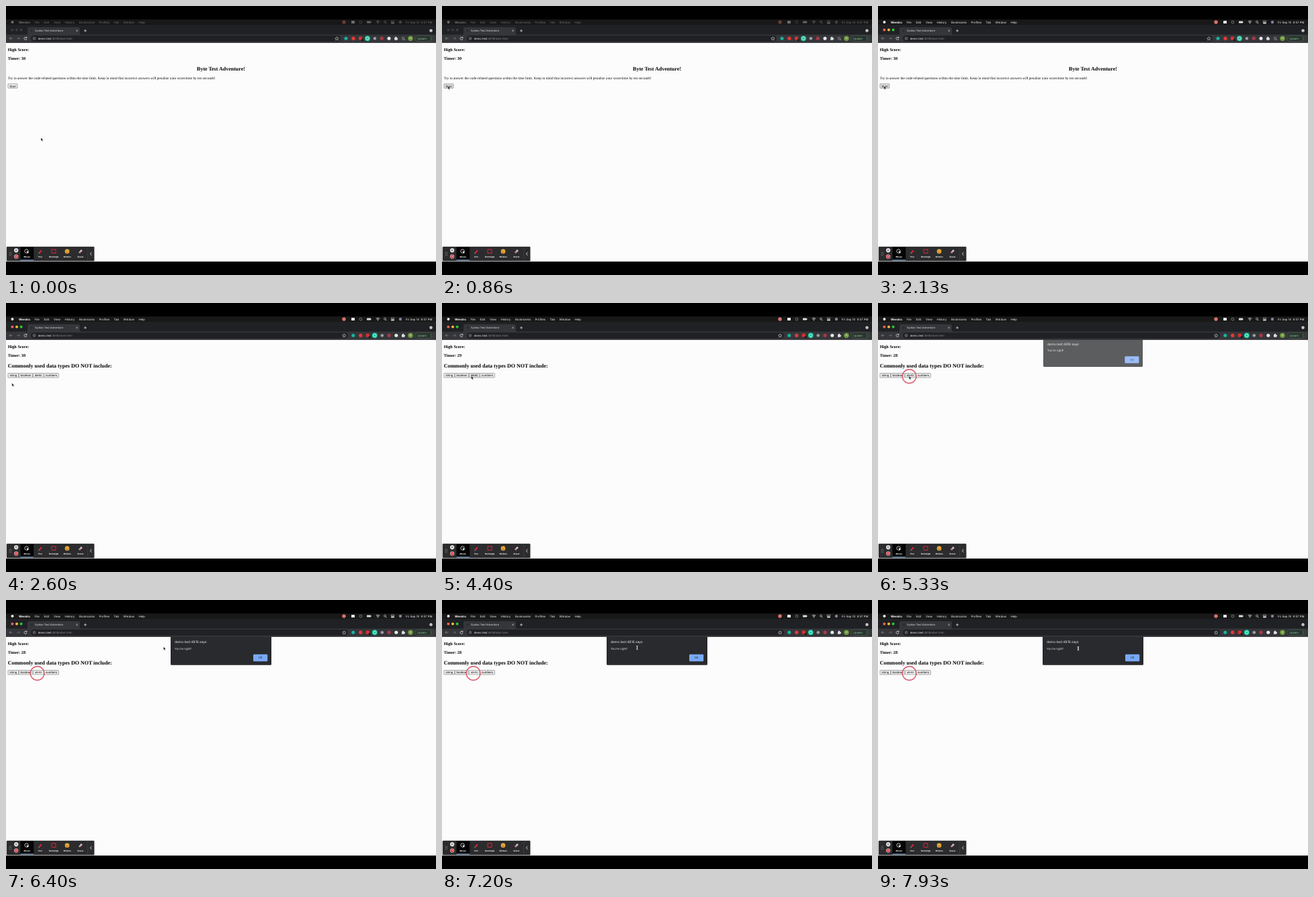
Recreate the animation shown at these times as an HTML page. Size 640 by 400 pixels, loop 8 s.

```html
<!DOCTYPE html>
<html lang="en">
<head>
<meta charset="utf-8">
<title>Quiz recording</title>
<style>
html, body { margin: 0; width: 100%; height: 100%; overflow: hidden; background: #000; }
svg { display: block; width: 640px; height: 400px; text-rendering: geometricPrecision; }
text { font-family: Inter, Roboto, sans-serif; white-space: pre; }
.page text { font-family: "Liberation Serif", serif; fill: #000; }
.page .btn text { font-family: "Liberation Sans", sans-serif; font-size: 4.44px; text-anchor: middle; }
.btn rect { fill: #efefef; stroke: #6f6f6f; stroke-width: .6; }
.btn.hover rect { fill: #e2e2e2; }
.b { font-weight: 700; }
</style>
</head>
<body>
<svg id="stage" viewBox="0 0 640 400"></svg>
<script>
const LOOP = 8000;
const stage = document.getElementById("stage");
const $ = id => document.getElementById(id);

const text = (x, y, size, str, more = "") => `<text x="${x}" y="${y}" font-size="${size}" ${more}>${str}</text>`;
const rect = (x, y, w, h, fill, more = "") => `<rect x="${x}" y="${y}" width="${w}" height="${h}" fill="${fill}" ${more}/>`;
const dot = (x, y, r, fill, more = "") => `<circle cx="${x}" cy="${y}" r="${r}" fill="${fill}" ${more}/>`;
const line = (d, color, width = .7, more = "") => `<path d="${d}" fill="none" stroke="${color}" stroke-width="${width}" ${more}/>`;
const group = (id, body) => `<g id="${id}">${body}</g>`;
const button = (x, y, w, label) => `<g class="btn" data-box="${x},${y},${w},7">` +
  rect(x + .3, y + .3, w - .6, 6.4, "", 'rx=".7"') + text(x + w / 2, y + 5.1, 4.44, label) + "</g>";

const page = `<g class="page">
  ${rect(0, 54.5, 640, 325.5, "#fcfcfc")}
  ${text(2.67, 66.7, 6.24, "High Score:", 'class="b"')}
  ${text(2.67, 79.9, 6.24, "", 'class="b" id="timer"')}
  ${group("intro",
    text(320, 95.7, 8, "Byte Test Adventure!", 'class="b" text-anchor="middle"') +
    text(2.67, 108.9, 5.33, "Try to answer the code-related questions within the time limit. Keep in mind that incorrect answers will penalize your score/time by ten seconds!") +
    button(2.67, 115.5, 14.6, "Start"))}
  ${group("question",
    text(2.67, 95.7, 8, "Commonly used data types DO NOT include:", 'class="b"') +
    button(2.67, 104.2, 16.3, "string") + button(18.97, 104.2, 21, "boolean") +
    button(39.97, 104.2, 16.4, "alerts") + button(56.37, 104.2, 22.3, "numbers"))}
</g>`;

const dialog = group("dialog",
  rect(245, 53.5, 150, 43.3, "#292a2d", 'rx="1.5"') +
  text(251, 64, 4.9, "demo.test:4816 says", 'fill="#e8eaed"') +
  text(251, 73.7, 4.3, "You're right!", 'fill="#e8eaed"') +
  rect(368, 80.7, 21.3, 10.6, "#78a9f7", 'rx="1.3"') +
  text(378.7, 87.4, 4, "OK", 'fill="#202124" text-anchor="middle"'));

const menus = [["File", 42.5], ["Edit", 56.5], ["View", 71], ["History", 87.5], ["Bookmarks", 109],
  ["Profiles", 138.5], ["Tab", 160.5], ["Window", 174.5], ["Help", 197.5]];
const menuBar = rect(0, 20, 640, 8, "#181818") + group("menu",
  dot(9.5, 24, 2, "#eee") +
  text(19, 25.6, 4.4, "Wendro", 'class="b" fill="#fff"') +
  menus.map(([m, x]) => text(x, 25.6, 4.35, m, 'fill="#f2f2f2"')).join("") +
  dot(503, 24, 2.7, "#d9746c") + rect(514, 22, 5, 4, "#eee", 'rx=".5"') +
  dot(528, 24, 1.9, "none", 'stroke="#999" stroke-width=".7"') +
  rect(537, 22.5, 6, 3, "#ddd", 'rx=".7"') + rect(543.4, 23.4, .6, 1.2, "#ddd") +
  line("M550.8 23.3q2.7-2.4 5.4 0M551.9 24.6q1.6-1.4 3.2 0", "#eee", .8) + dot(553.5, 25.7, .6, "#eee") +
  dot(564, 23.6, 1.5, "none", 'stroke="#eee" stroke-width=".6"') + line("M565 24.7l1.6 1.6", "#eee") +
  rect(573, 22, 5, 1.7, "none", 'rx=".8" stroke="#eee" stroke-width=".5"') + rect(573, 24.5, 5, 1.7, "#eee", 'rx=".8"') +
  dot(587, 24, 2.2, "#8b7d9c") +
  text(634.5, 25.6, 4.35, "Fri Sep 10  9:57 PM", 'fill="#f2f2f2" text-anchor="end"'));

const cross = (x, y, r) => `M${x - r} ${y - r}l${2 * r} ${2 * r}M${x + r} ${y - r}l${-2 * r} ${2 * r}`;
const lights = ["#ff5f57", "#febc2e", "#28c840"];
const tabs = rect(0, 28, 640, 15, "#202124") +
  `<path d="M30 43q2 0 2-2v-7q0-2.5 2.5-2.5h73q2.5 0 2.5 2.5v7q0 2 2 2z" fill="#35363a"/>` +
  group("lights", lights.map((c, i) => dot(9.4 + i * 6.6, 35.6, 2, c)).join("")) +
  group("lightsOff", lights.map((c, i) => dot(9.4 + i * 6.6, 35.6, 2, "#3b3c40")).join("")) +
  dot(38, 36.7, 1.8, "#2a2b2e") +
  text(43, 38.1, 3.95, "Syntax Test Adventure", 'fill="#dfe1e5"') +
  line(cross(105.6, 36.7, 1.2), "#e8eaed", .6) +
  line("M118 34.8v4M116 36.8h4", "#e8eaed", .7) +
  dot(632.5, 36.6, 2.2, "#e8eaed") + line("M631.4 36.2l1.1 1.1 1.1-1.1", "#202124", .6);

const extensions = [[506, "#18b3a0", 2.5], [517, "#e03a36", 2.7], [549, "#9a9da1", 2.3],
  [559.3, "#a93a45", 2.6], [570, "#e9eaec", 2.5]];
const toolbar = rect(0, 42.5, 640, 12.2, "#35363a") +
  line("M9.6 48.2H5M7 46.2l-2 2 2 2", "#8d9094", .7) + line("M16 48.2h4.6M18.6 46.2l2 2-2 2", "#707377", .7) +
  line("M30.6 47.2a2 2 0 1 0 .3 1.6M31 45.8v1.7h-1.7", "#e8eaed", .7) +
  rect(37, 43.9, 461, 8.8, "#202124", 'rx="4.4" id="pill"') +
  dot(42, 48.3, 1.8, "none", 'stroke="#aeb1b5" stroke-width=".6"') + line("M42 47.9v1.4M42 46.9v.5", "#aeb1b5", .5) +
  text(47.7, 49.8, 4.2, 'demo.test<tspan fill="#8b8f94">:4816/start.html</tspan>', 'fill="#f1f3f4"') +
  group("tools",
    `<path d="M492.5 45.7l.8 1.8 1.9.2-1.4 1.3.4 1.9-1.7-1-1.7 1 .4-1.9-1.4-1.3 1.9-.2z" fill="none" stroke="#d5d7da" stroke-width=".6"/>` +
    extensions.map(([x, c, r]) => dot(x, 48.2, r, c)).join("") +
    rect(525, 45.6, 5, 5, "#d9302f", 'rx=".6"') + rect(529, 49.6, 2.6, 2.2, "#111") +
    dot(538, 48.2, 4, "#16c098") + dot(538, 48.2, 2.2, "none", 'stroke="#d9fff4" stroke-width=".8"') +
    rect(578.2, 46.7, 4, 4, "#dcdee1", 'rx=".5"') + dot(580.2, 46.4, 1, "#dcdee1") + dot(582.4, 48.7, 1, "#dcdee1")) +
  group("playlist", line("M588.7 46.6h4.6M588.7 48.2h4.6M588.7 49.8h2.4", "#9a9da1", .6) + dot(592.7, 50, .9, "#9a9da1")) +
  dot(602, 48.2, 3.7, "#6e9c3c") + text(602, 49.4, 3.3, "M", 'fill="#eaf3dd" text-anchor="middle"') +
  rect(609, 44, 27, 8.5, "#2b332f", 'rx="4.2" stroke="#56705f" stroke-width=".5"') +
  text(612, 49.7, 4, "Update", 'fill="#81c995"') +
  [46.3, 48.2, 50.1].map(y => dot(632.8, y, .5, "#81c995")).join("");

const label = (x, s) => text(x, 373.9, 2.9, s, 'class="b" fill="#fff" text-anchor="middle"');
const recorder = rect(.5, 357.5, 131.5, 22.5, "#777", 'rx="1.5" opacity=".5"') +
  rect(1, 358, 130.2, 21, "#2c2c2e", 'rx="1"') +
  [366.2, 368.5, 370.8].map(y => dot(5.3, y, .5, "#aaa") + dot(7.3, y, .5, "#aaa")).join("") +
  dot(15.2, 363.3, 3.1, "#f2f2f2") + line("M14.4 362v2.6M16 362v2.6", "#333", .7) +
  dot(15.2, 372.5, 3.1, "#f2f2f2") + dot(15.2, 372.5, 2.6, "#e0353b") + line(cross(15.2, 372.5, .9), "#fff", .6) +
  rect(21.5, 358.5, 19.7, 20, "#050505") + rect(21.5, 377.3, 19.7, 1.2, "#7fa9d8") +
  dot(30.6, 364.6, 2.8, "none", 'stroke="#e8e8e8" stroke-width=".8"') +
  `<path d="M30.6 364l3.8 2.3-1.8.5-.6 1.8z" fill="#fff"/>` +
  line("M49.3 367.4l3.6-4", "#e3263a", 2) + line("M48.5 368.3l.9-1", "#fff", .7) +
  rect(68, 362, 6, 5.5, "none", 'stroke="#e3263a" stroke-width=".9"') +
  dot(91, 364.9, 3.3, "#f2b33c") + dot(89.8, 364.1, .5, "#5a3510") + dot(92.2, 364.1, .5, "#5a3510") +
  line("M89.2 365.8q1.8 1.9 3.6 0", "#8a3a18", .7) +
  line("M108.9 367l2.2-2.2", "#e58a8f", 2.5) + line("M110.9 365l2-2", "#c9c9cc", 2.5) +
  label(31.3, "Mouse") + label(51, "Pen") + label(71.2, "Rectangle") + label(91.2, "Stickers") + label(111, "Eraser") +
  line("M121.7 358.5v20", "#4a4a4c", .5) + line("M127.4 366.2l-2 2.3 2 2.3", "#fff", .8);

const pointers = dot(0, 0, 10.3, "#fff", 'id="ring" fill-opacity=".15" stroke="#d85a6b" stroke-width="1.4"') +
  `<path id="arrow" d="M0 0v4.6l1.1-1 .8 1.8 .9-.4-.8-1.7h1.5z" fill="#000" stroke="#fff" stroke-width=".4"/>` +
  group("beam", line("M-1.2-2.7q1.2 0 1.2 1v3.4q0 1-1.2 1M1.2-2.7q-1.2 0-1.2 1v3.4q0 1 1.2 1", "#fff", .8));

stage.innerHTML = page + dialog + tabs + toolbar + menuBar + recorder + pointers;

// time, x, y of the pointer
const path = [[0, 52, 196], [60, 52, 196], [330, 39, 183], [830, 8.8, 119.2], [4130, 8.8, 119.2],
  [4400, 43.6, 108.8], [4690, 46.2, 108.8], [6080, 46.2, 108.8], [6400, 234.2, 69.6],
  [6690, 268, 69], [6880, 268, 69], [7680, 303, 72], [7770, 303, 72], [7930, 298, 72], [LOOP, 298, 72]];
const clicks = [[930, 8.8, 119.2], [2200, 8.8, 119.2], [5130, 46.6, 109]];
const clamp = v => Math.max(0, Math.min(1, v));
const show = (id, on) => $(id).style.display = on ? "" : "none";
const buttons = [...document.querySelectorAll(".btn")].map(node => ({ node, box: node.dataset.box.split(",").map(Number) }));

function pointerAt(t) {
  const i = path.findIndex(p => p[0] > t);
  const a = path[i - 1], b = path[i];
  const k = (t - a[0]) / (b[0] - a[0]);
  const e = k * (2 - k);
  return [a[1] + (b[1] - a[1]) * e, a[2] + (b[2] - a[2]) * e];
}

function draw(t) {
  const [x, y] = pointerAt(t);
  const focused = t >= 1000, started = t >= 2500;
  $("menu").setAttribute("opacity", focused ? 1 : .4);
  show("lights", focused);
  show("lightsOff", !focused);
  show("intro", !started);
  show("question", started);
  show("playlist", !started);
  $("tools").setAttribute("transform", `translate(${started ? 10.8 : 0})`);
  $("pill").setAttribute("width", started ? 472 : 461);
  $("timer").textContent = "Timer: " + (t < 3530 ? 30 : t < 4530 ? 29 : 28);

  const open = clamp((t - 5260) / 140);
  show("dialog", open > 0);
  $("dialog").setAttribute("opacity", .5 + open / 2);
  $("dialog").setAttribute("transform", `translate(320 ${75 - 3 * (1 - open)}) scale(${.974 + .026 * open}) translate(-320 -75)`);

  // The open dialog freezes the last click ring.
  const click = clicks.find(c => t >= c[0] && (c[0] > 5000 || t < c[0] + 330));
  show("ring", click);
  if (click) {
    const age = t - click[0];
    $("ring").setAttribute("transform", `translate(${click[1]} ${click[2]})`);
    $("ring").setAttribute("r", 4 + 6.3 * clamp(age / 130));
    $("ring").setAttribute("opacity", click[0] > 5000 ? 1 : 1 - clamp((age - 200) / 130));
  }

  const typing = t > 6400 && x > 250;
  show("arrow", !typing);
  show("beam", typing);
  $(typing ? "beam" : "arrow").setAttribute("transform", `translate(${x} ${y})`);
  for (const { node, box: [bx, by, w, h] } of buttons)
    node.classList.toggle("hover", x > bx && x < bx + w && y > by && y < by + h);
}

const start = performance.now();
function tick() {
  draw((performance.now() - start) % LOOP);
  requestAnimationFrame(tick);
}
tick();
</script>
</body>
</html>
```
